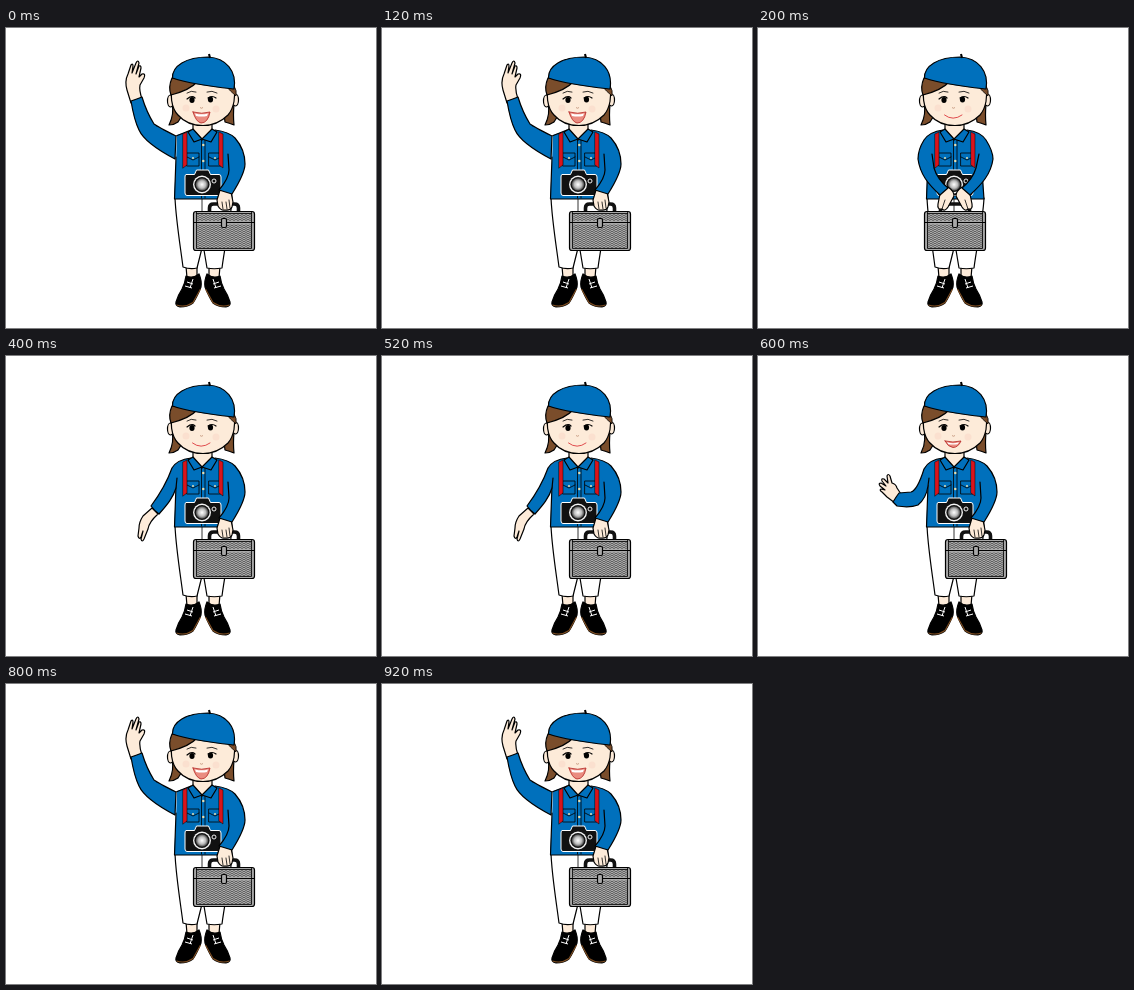
An HTML page that plays this animation: 370 px wide and 300 px high, repeating every 1 s.

```html
<!DOCTYPE html>
<html lang="en">
<head>
<meta charset="utf-8">
<title>Photographer waving</title>
<style>
  html, body { margin: 0; width: 100%; height: 100%; overflow: hidden; background: #fff; }
  svg { display: block; width: 370px; height: 300px; }
  .ink { stroke: #000; stroke-width: 1.2; stroke-linejoin: round; stroke-linecap: round; }
  .line { fill: none; }
  .blue { fill: #0070bc; }
  .skin { fill: #fdebd9; }
  .hair { fill: #7a4d2b; }
  .red { fill: #d8141c; }
  .white { fill: #fff; }
  .fine { stroke-width: .8; }
  .thin { stroke-width: .5; }
</style>
</head>
<body>
<svg viewBox="0 0 370 300">
  <defs>
    <pattern id="weave" width="4" height="4" patternUnits="userSpaceOnUse">
      <path fill="#b4b4b4" d="M0 0H4V4H0Z"/>
      <path stroke="#4c4c4c" stroke-width=".9" fill="none" d="M0 .5L2 1.7L4 .5M0 2.5L2 3.7L4 2.5"/>
    </pattern>
    <radialGradient id="glass">
      <stop offset="0" stop-color="#fff"/>
      <stop offset=".6" stop-color="#bbb"/>
      <stop offset="1" stop-color="#444"/>
    </radialGradient>
    <g id="shoe">
      <path class="skin ink" d="M180 238L181 250H191L191 238Z"/>
      <path class="ink" d="M180 248Q187 251 193 246Q196 253 195 259Q191 269 187 275Q182 279 174 279Q169 278 170 274Q172 267 176 261Q179 255 180 248Z"/>
      <path class="line" stroke="#7d4d22" stroke-width="1.100" d="M170.500 277Q179 280 187 274.500L194.500 261"/>
      <path class="line" stroke="#fff" stroke-width="1" d="M181 254L187 256M179 258L186 260M187 251L184 260"/>
    </g>
    <g id="pocket">
      <path class="blue ink fine" d="M181 125H193V138H181Z"/>
      <path class="line ink fine" d="M181 129L187 132L193 129"/>
    </g>
  </defs>

  <g id="legs">
    <use href="#shoe"/>
    <use href="#shoe" transform="matrix(-1 0 0 1 394 0)"/>
    <path class="white ink" d="M169 170H226C225 192 219 216 216 240Q208 241.500 201 240L197 216L191 240Q184 241.500 177 239C174 216 170 192 169 170Z"/>
    <path class="line ink fine" d="M196 171V214"/>
  </g>

  <g id="jacket">
    <path class="blue" d="M183 103Q197 98 211 103L221 106L224 135L226 171H168L170 135L171 107Z"/>
    <path class="line ink" d="M170 129L168.500 171H226L223 129"/>
    <path class="line ink fine" d="M195.500 110V170M199 112V170"/>
    <use href="#pocket"/>
    <use href="#pocket" x="22"/>
    <g fill="#e8dfb0">
      <circle cx="197.300" cy="117" r="1.200"/><circle cx="197.300" cy="133" r="1.200"/>
      <circle cx="187" cy="130" r="1"/><circle cx="209" cy="130" r="1"/>
    </g>
  </g>

  <g id="camera">
    <path fill="#111" stroke="#fff" stroke-width="1" d="M180 146.500H188.500L190.500 142H202.500L204.500 146.500H213Q215 146.500 215 149V165Q215 167.500 213 167.500H181Q179 167.500 179 165V149Q179 146.500 180 146.500Z"/>
    <circle cx="196" cy="156.500" r="9" fill="#f4f4f4"/>
    <circle cx="196" cy="156.500" r="7.600" fill="#111"/>
    <circle cx="196" cy="156.500" r="6.200" fill="url(#glass)"/>
    <circle cx="208" cy="153" r="2" fill="#111" stroke="#eee"/>
  </g>

  <g id="case">
    <path class="line" stroke="#111" stroke-width="3.600" d="M203.500 184V180Q203.500 176 207.500 176H228.500Q232.500 176 232.500 180V184"/>
    <rect class="ink" x="187.500" y="183.500" width="61" height="39" rx="2.500" fill="#a8a8a8"/>
    <path fill="url(#weave)" d="M190 185.500H246V193H190ZM190 196.500H246V220H190Z"/>
    <path class="line ink" d="M188 194.500H248"/>
    <path class="line ink fine" d="M190.500 185.500H245.500M190.500 184V220.500H245.500V184"/>
    <rect class="ink" x="215.500" y="190.500" width="5" height="9" rx="1.500" fill="#a8a8a8"/>
  </g>

  <path id="leftHand" class="skin ink"/>
  <path id="leftSleeve" class="blue ink"/>
  <path id="rightHand" class="skin ink"/>
  <path id="rightSleeve" class="blue ink"/>
  <path id="fingers" class="line ink fine"/>

  <g id="straps" class="red ink thin">
    <path d="M177 106L181 104V137L177 140Z"/>
    <path d="M213 104L217 106V140L213 137Z"/>
  </g>
  <g id="neck">
    <path class="skin ink" d="M187 94V102L196 112L206 102V94Z"/>
    <path class="blue ink" d="M187 101L182 104L188 114L196 111Z"/>
    <path class="blue ink" d="M206 101L211 104L205 114L196 111Z"/>
  </g>

  <g id="head">
    <path class="hair ink" d="M166 76C168 84 166 91 163 97Q168 97 172 94L177 86L218 86L219 94Q223 95 228 97Q227 88 228 76Z"/>
    <g class="skin ink">
      <ellipse cx="164.500" cy="73" rx="3" ry="6"/><ellipse cx="229.500" cy="72" rx="3" ry="6"/>
    </g>
    <path class="skin ink" d="M166 54C164 66 165 80 172 87C178 94 187 97.500 197 97.500C207 97.500 215 94 222 87C228 80 230 68 228 57Z"/>
    <path class="hair ink" d="M166 50L191 54Q184 62 165 67Q162 59 166 50Z"/>
    <path class="hair ink fine" d="M219 57L228 58Q231 62 230 68Q225 64 219 57Z"/>
    <path class="blue ink" d="M166.500 50C166 38 180 29 202 29C220 30 231 43 228 61C209 59 188 57 166.500 50Z"/>
    <path class="line" stroke="#000" stroke-width="2" d="M204 30L203 26"/>
    <g fill="#fbe0cf"><circle cx="180" cy="80" r="3.500"/><circle cx="210" cy="81" r="3.500"/></g>
    <path class="line ink fine" d="M181 65Q185 62 190 64M201 64Q206 62 211 65"/>
    <ellipse cx="186" cy="72" rx="2.600" ry="2.900"/>
    <ellipse cx="204.500" cy="71.500" rx="2.600" ry="2.900"/>
    <path class="line ink" d="M181 71Q186 67 189 70M202 70Q206 67 210 70"/>
    <path class="line" stroke="#c79a80" stroke-width=".9" d="M194 79.500Q195.500 81 197 79.500"/>
    <path id="mouth" class="ink fine"/>
    <path id="teeth" class="white"/>
  </g>
</svg>
<script>
  const STEP = 200;
  const parts = {};
  for (const id of ["leftHand", "leftSleeve", "rightHand", "rightSleeve", "fingers", "mouth", "teeth"])
    parts[id] = document.getElementById(id);
  const bag = document.getElementById("case");

  const laugh = { mouth: "M187 84Q196 86.500 204 84Q202 95 195 95Q190 94 187 84Z", teeth: "M189 85.500Q196 87.200 202 85.500L201 88Q196 89 190 88Z" };
  const grin = { mouth: "M187 85Q195 87 203 85Q200 91.500 195 91.500Q190 91 187 85Z", teeth: "M189 86.300Q195 88 201 86.300L199.500 88.200Q195 89 190.500 88.200Z" };
  const smile = { mouth: "M186.500 87Q195 93.500 204 87", teeth: "" };

  const carry = {
    rightHand: "M214 162L211 172L212 178Q215 183 219 182Q224 183 226 179L227 174L225 164Z",
    rightSleeve: "M209 102C217 103 224 105 229 110C236 118 239 127 239 136C239 144 231 158 226 166L213 162C219 155 223 148 223 142L222 126",
    fingers: "M216 174L217 181M220 174L221 181M223 172L224 180",
    shift: 0
  };

  const wave = {
    ...carry, ...laugh,
    leftHand: "M125 75L121 62C119 55 120 50 122 46L125 37Q127 35 127 38L126 45L130 35Q132 31 133 35L130 46L133 38Q135 37 135 40L133 49L136 46Q140 45 138 50L134 57Q133 62 136 71Z",
    leftSleeve: "M185 102L170 108C160 103 152 99 148 96C143 88 139 79 136 69Q131 71 125 73C127 85 129 94 133 102C137 111 150 121 169 131L170 108"
  };
  const hold = {
    ...smile,
    leftHand: "M182 166L190 159Q196 163 196 168L190 179Q187 184 184 181Q179 182 180 176Z",
    leftSleeve: "M185 102C177 103 170 106 166 112C161 120 160 127 160 131C162 146 170 156 182 167L190 160C183 154 178 147 176 140L174 126",
    rightHand: "M212 166L204 159Q198 163 198 168L204 179Q207 184 210 181Q215 182 214 176Z",
    rightSleeve: "M209 102C217 103 224 106 228 112C233 120 235 127 235 131C233 146 224 156 212 167L204 160C211 154 216 147 218 140L221 126",
    fingers: "M187 172L184 181M207 172L210 181",
    shift: -21
  };
  const lower = {
    ...carry, ...smile,
    leftHand: "M146 152L137 160Q133 166 133 172L132 180Q133 184 135 181L137 175L135 183Q136 187 138 183L142 173Q143 166 152 158Z",
    leftSleeve: "M185 102C176 103 169 107 166 112C161 126 154 138 145 150Q148 154 153 158C161 149 167 142 170 132L171 122"
  };
  const raise = {
    ...carry, ...grin,
    leftHand: "M143 138L139 132Q138 128 134 127L132 120Q130 117 129 120L130 127L126 123Q123 122 124 125L128 130L123 127Q120 127 122 130L127 134L123 133Q121 134 124 136L129 141L137 147Z",
    leftSleeve: "M185 102C176 103 169 107 166 113C161 129 157 135 153 136L141 137Q138 141 135 146L139 150Q152 152 160 149C166 144 169 137 170 130L171 122"
  };
  const poses = [wave, hold, lower, raise, wave];

  function draw(ms) {
    const pose = poses[Math.floor(ms / STEP) % poses.length];
    for (const id in parts) parts[id].setAttribute("d", pose[id]);
    const open = pose.teeth !== "";
    parts.mouth.style.fill = open ? "#ea8c80" : "none";
    parts.mouth.style.stroke = open ? "#b3201f" : "#d8232a";
    bag.setAttribute("transform", `translate(${pose.shift} 0)`);
  }

  const start = performance.now();
  function tick() {
    draw(performance.now() - start);
    requestAnimationFrame(tick);
  }
  draw(0);
  requestAnimationFrame(tick);
</script>
</body>
</html>
```
